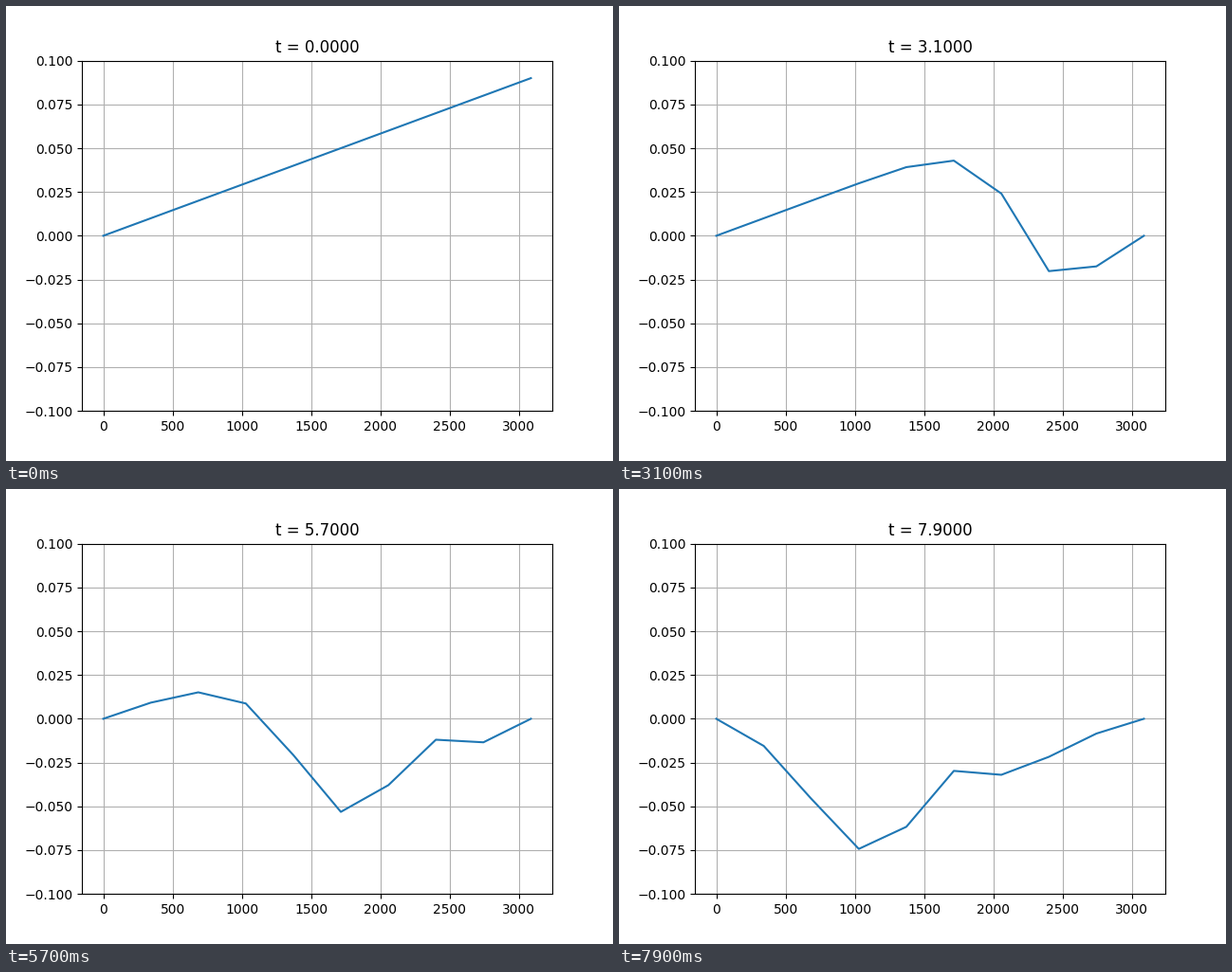
These frames come from a looping animation (640x480 px, 8000 ms). A matplotlib script:

```python
import numpy as np
import matplotlib.pyplot as plt
from matplotlib.animation import FuncAnimation

SPEED = 343.0   # wave speed
DX = 343.0      # node spacing
DT = 0.1
NODES = 10
STEPS = 80


def solve():
    """Leapfrog solution of the wave equation; the right end is released at the first step."""
    u = np.zeros((STEPS, NODES))
    u[0] = 0.01 * np.arange(NODES)
    u[1] = u[0]
    u[1, -1] = 0
    k = (SPEED * DT / DX) ** 2
    for n in range(1, STEPS - 1):
        u[n + 1, 1:-1] = (2 * u[n, 1:-1] - u[n - 1, 1:-1]
                          + k * np.diff(u[n], 2))
    return u


x = DX * np.arange(NODES)
wave = solve()

fig, ax = plt.subplots(figsize=(6.4, 4.8), dpi=100)
line, = ax.plot(x, wave[0])
ax.set_ylim(-0.1, 0.1)
ax.grid(True)
title = ax.set_title("t = 0.0000")


def update(i):
    line.set_ydata(wave[i])
    title.set_text(f"t = {i * DT:.4f}")
    return line, title


anim = FuncAnimation(fig, update, frames=STEPS, interval=100,
                     repeat=True, repeat_delay=0, blit=False)
plt.show()
```
